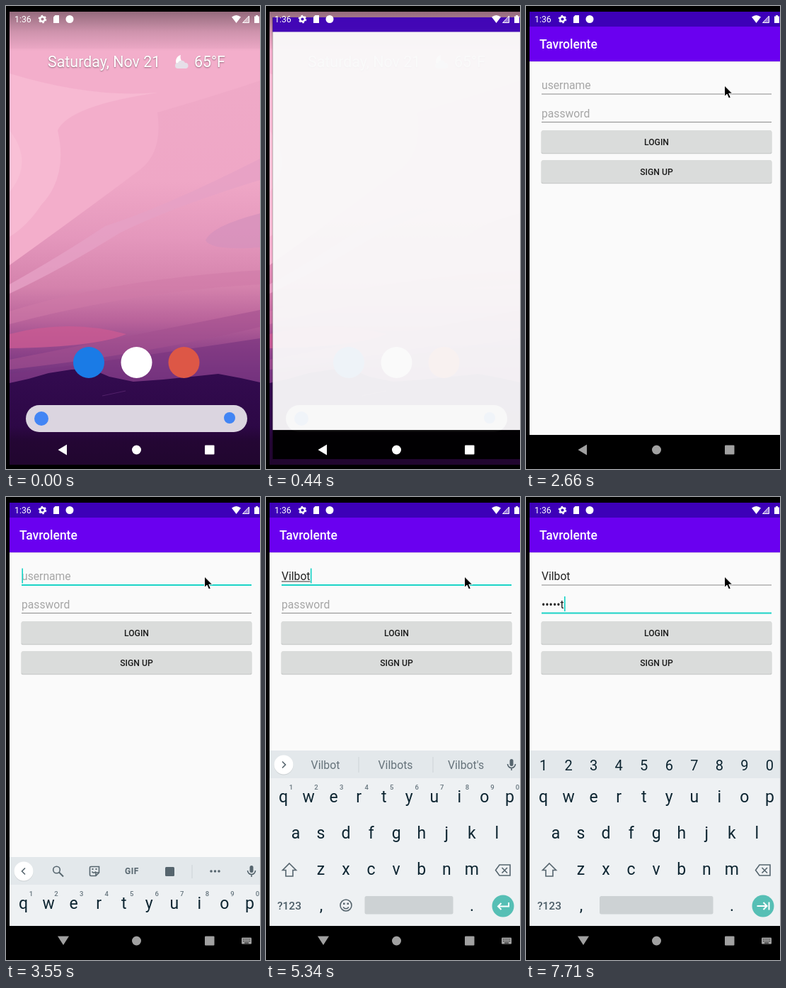
These frames come from a looping animation (359x652 px, 8000 ms). An HTML page:

```html
<!DOCTYPE html>
<html lang="en">
<head>
<meta charset="utf-8">
<title>Login demo</title>
<style>
html, body { margin: 0; width: 100%; height: 100%; overflow: hidden; background: #000; }
svg { display: block; width: 359px; height: 652px; font-family: Roboto, sans-serif; }
.mid { text-anchor: middle; }
.med { font-weight: 500; }
.field { font-size: 15.7px; }
.icon { fill: none; stroke: #56656e; stroke-width: 1.6; }
</style>
</head>
<body>
<svg viewBox="0 0 359 652">
  <defs>
    <linearGradient id="sky" gradientUnits="userSpaceOnUse" x1="0" y1="8" x2="0" y2="540">
      <stop offset="0" stop-color="#efabc8"/><stop offset=".45" stop-color="#efa7c6"/>
      <stop offset=".6" stop-color="#e497bc"/><stop offset=".73" stop-color="#d482ac"/>
      <stop offset=".82" stop-color="#b8629a"/><stop offset=".9" stop-color="#8e4389"/>
      <stop offset="1" stop-color="#5f2a78"/>
    </linearGradient>
    <linearGradient id="hill" x1="0" y1="0" x2="0" y2="1">
      <stop offset="0" stop-color="#330b50"/><stop offset=".6" stop-color="#2d0846"/>
      <stop offset=".75" stop-color="#240634"/><stop offset="1" stop-color="#21062f"/>
    </linearGradient>
    <linearGradient id="shade" x1="0" y1="0" x2="0" y2="1">
      <stop offset="0" stop-color="#000" stop-opacity=".38"/><stop offset=".5" stop-color="#000" stop-opacity=".14"/>
      <stop offset="1" stop-color="#000" stop-opacity="0"/>
    </linearGradient>
    <clipPath id="panel"><rect x="5" y="29" width="354" height="575"/></clipPath>
  </defs>

  <g id="home">
    <rect x="5" y="8" width="359" height="638" fill="url(#sky)"/>
    <path d="M5 60H359V105Q300 125 214 150Q222 205 190 230Q110 290 5 365Z" fill="#f3aecb"/>
    <path d="M5 95Q120 130 215 122Q90 140 73 175Q88 240 50 280Q30 310 5 325Z" fill="#f7b9d2"/>
    <path d="M5 175Q40 220 5 262Z" fill="#f9c0d6"/>
    <path d="M5 392Q80 350 140 310Q220 285 359 215V245Q230 285 160 320Q80 370 5 405Z" fill="#e6a2c6" opacity=".8"/>
    <path d="M359 292Q290 310 282 330Q290 345 359 340Z" fill="#d893bd" opacity=".8"/>
    <path d="M5 430Q150 385 359 372V392Q180 402 5 448Z" fill="#d07aa8" opacity=".55"/>
    <path d="M5 462Q90 440 170 462Q130 480 5 482Z" fill="#cb5a93" opacity=".8"/>
    <path d="M5 498Q150 470 359 428V452Q200 490 5 512Z" fill="#a4508f" opacity=".6"/>
    <path d="M5 518Q160 498 359 468V535H5Z" fill="#7a3580" opacity=".65"/>
    <path d="M5 531L32 525L60 517L92 512L120 511L146 522L180 529L222 526L262 522L300 518L332 524L359 530V646H5Z" fill="url(#hill)"/>
    <path d="M136 549L169 542" stroke="#512069"/>
    <rect x="5" y="8" width="354" height="56" fill="url(#shade)"/>
    <g fill="#fff" font-size="21.4" style="text-shadow:0 1px 2px #0006">
      <text x="59" y="86">Saturday, Nov 21</text><text x="266" y="86">65°F</text>
    </g>
    <path d="M247 69A9 9 0 1 0 257 82A10 10 0 0 1 247 69Z" fill="#fff"/>
    <path d="M243 88a4 4 0 0 1 0-8a5.500 5.500 0 0 1 10 0a4 4 0 0 1 1 8Z" fill="#e6dfe8"/>
    <circle cx="117" cy="502" r="22" fill="#1a7be6"/>
    <circle cx="184.500" cy="502" r="22" fill="#fff"/>
    <circle cx="251.500" cy="502" r="22" fill="#dd5746"/>
    <rect x="28" y="562" width="313" height="38" rx="19" fill="#dbd5e0"/>
    <circle cx="50" cy="581" r="10" fill="#4285f4"/>
    <circle cx="316" cy="580" r="8" fill="#4285f4"/>
  </g>

  <g id="win">
    <rect x="5" y="8" width="359" height="638"/>
    <rect x="5" y="8" width="359" height="21.500" fill="#3d00b8"/>
    <rect x="5" y="29" width="359" height="575" fill="#fafafa"/>
  </g>

  <g id="app">
    <rect x="5" y="29" width="354" height="49" fill="#6a00f0"/>
    <rect x="5" y="78" width="354" height="1" fill="#e2e2e2"/>
    <text class="med" x="19" y="60" font-size="17.500" fill="#fff">Tavrolente</text>
    <g id="fields"></g>
    <g id="buttons"></g>
  </g>

  <g clip-path="url(#panel)"><g id="kb">
    <rect x="5" y="357" width="354" height="247" fill="#eef1f3"/>
    <rect x="5" y="357" width="354" height="39" fill="#e3e8eb"/>
    <g id="keys" class="mid" font-size="23" fill="#0d2531"></g>
    <g id="hints" class="mid med" font-size="9.500" fill="#66757e"></g>
    <g id="digits" class="mid" font-size="20" fill="#0d2531"></g>
    <text class="med" x="16" y="581" font-size="15.500" fill="#4b5c66">?123</text>
    <g class="icon">
      <path d="M33 516L42.500 525.500H38V534H28V525.500H23.500Z"/>
      <path d="M330 518H345V533H330L324.500 525.500ZM333.500 522L341 529.500M341 522L333.500 529.500"/>
      <circle cx="113" cy="575" r="8"/><path d="M109 577.500Q113 582 117 577.500"/>
    </g>
    <path d="M109 571.500h2.500v2.500h-2.500zM114.500 571.500h2.500v2.500h-2.500z" fill="#56656e"/>
    <rect id="space" y="562" height="25.500" rx="2.500" fill="#cdd2d4"/>
    <circle cx="335" cy="576" r="15.500" fill="#56bfb5"/>
    <path id="enter" fill="none" stroke="#fff" stroke-width="2"/>
    <g id="bar">
      <circle cx="25" cy="378" r="13.500" fill="#cbd0d3"/><circle cx="25" cy="377" r="13.500" fill="#fff"/>
      <path id="chev" class="icon"/>
      <rect x="344.500" y="369" width="5" height="10" rx="2.500" fill="#56656e"/>
      <path class="icon" d="M341.500 376a5.500 5.500 0 0 0 11 0M347 381.500V385"/>
    </g>
    <g id="tools">
      <g class="icon">
        <circle cx="71.500" cy="375" r="4.800"/><path d="M75 378.500L81 384.500" stroke-width="2"/>
        <path d="M120 370.500H131.500V379L127 383.500H120Q118.500 383.500 118.500 382V372Q118.500 370.500 120 370.500ZM131.500 379H127V383.500M121.500 377.500Q124 381 127 377.500"/>
      </g>
      <path d="M121.500 373h2v2h-2zM126.500 373h2v2h-2z" fill="#56656e"/>
      <text class="mid" x="178" y="381" font-size="12" font-weight="700" fill="#56656e" letter-spacing=".6">GIF</text>
      <rect x="225" y="371" width="13" height="13" rx="1.500" fill="#56656e"/>
      <path d="M263 368V387" stroke="#cdd3d7"/>
      <path d="M290 377h.01M295.500 377h.01M301 377h.01" stroke="#56656e" stroke-width="3.600" stroke-linecap="round"/>
    </g>
    <g id="sugg" class="mid" font-size="15.800" fill="#66737b"><path d="M131 366V388M236 366V388" stroke="#cdd3d7"/></g>
  </g></g>

  <g fill="#fff">
    <text x="12" y="23" font-size="12.300">1:36</text>
    <circle cx="51.500" cy="18.500" r="3.300" fill="none" stroke="#fff" stroke-width="2.400"/>
    <circle cx="51.500" cy="18.500" r="5" fill="none" stroke="#fff" stroke-width="1.600" stroke-dasharray="2.6 2.636"/>
    <path d="M69.500 13H75V24H67V15.500Z"/>
    <circle cx="90" cy="18.500" r="5.500"/>
    <path d="M319 15.500Q325.500 10.500 332 15.500L325.500 24Z"/>
    <path d="M334.500 23.500L343.500 14V23.500Z" fill-opacity=".45" stroke="#fff"/>
    <path d="M351 14.500h2v-1.500h3v1.500h2v9.500h-7z"/>
  </g>

  <g id="nav" fill="#fff">
    <path id="back"/>
    <circle cx="184.500" cy="625" r="6.500"/>
    <rect x="281" y="618.500" width="13.500" height="13" rx="1"/>
    <g id="ime"><rect x="333" y="620.500" width="14" height="9" rx="1"/>
      <path d="M335 623H345M335 625.500H345" stroke="#000" stroke-dasharray="1 1.250"/><path d="M337 628H343" stroke="#000"/></g>
  </g>
  <path id="mouse" d="M0 0V15.500L3.600 12.200L6.100 18L8.800 16.800L6.300 11.200H11.200Z" stroke="#fff"/>
</svg>

<script>
const LOOP = 8000, NAME = 'Vilbot';
const $ = id => document.getElementById(id);

function add(parent, tag, attrs, text = '') {
  const el = document.createElementNS('http://www.w3.org/2000/svg', tag);
  for (const k in attrs) el.setAttribute(k, attrs[k]);
  el.textContent = text;
  return $(parent).appendChild(el);
}
const set = (id, attrs) => { for (const k in attrs) $(id).setAttribute(k, attrs[k]); };
const show = (id, on) => { $(id).style.display = on ? '' : 'none'; };
const at = (steps, t) => steps.reduce((v, s) => t >= s[0] ? s : v, null);

// Form
function makeField(hint, y) {
  const line = add('fields', 'rect', { x: 22, width: 325 });
  const label = add('fields', 'text', { class: 'field', x: 22, y });
  const mark = add('fields', 'rect', { x: 22, y: y + 1.5, height: 1, fill: '#333' });
  const caret = add('fields', 'rect', { y: y - 16.5, width: 1.6, height: 21, fill: '#14d3c6' });
  return (text, focus, composing, blinkOn) => {
    label.textContent = text || hint;
    label.setAttribute('fill', text ? '#222' : '#a6a6a6');
    const w = text ? label.getComputedTextLength() : 0;
    mark.setAttribute('width', composing ? w : 0);
    caret.setAttribute('x', 22.4 + w);
    caret.style.display = focus && blinkOn ? '' : 'none';
    line.setAttribute('y', y + (focus ? 6 : 6.5));
    line.setAttribute('height', focus ? 2 : 1);
    line.setAttribute('fill', focus ? '#1bd4c7' : '#8b8b8b');
  };
}
const user = makeField('username', 117), pass = makeField('password', 156.5);
[['LOGIN', 175], ['SIGN UP', 217]].forEach(([s, y]) => {
  add('buttons', 'rect', { x: 21.5, y: y + .8, width: 326, height: 32.5, rx: 2, fill: '#c9cbca' });
  add('buttons', 'rect', { x: 22, y, width: 325, height: 32, rx: 2, fill: '#dadcdb' });
  add('buttons', 'text', { class: 'mid med', x: 184.5, y: y + 20.7, 'font-size': 12.2, fill: '#1b1b1b' }, s);
});

// Keyboard
[['qwertyuiop', 24.5, 430], ['asdfghjkl', 42, 481], ['zxcvbnm', 77.5, 532]].forEach(([row, x0, y]) =>
  [...row].forEach((c, i) => add('keys', 'text', { x: x0 + i * 35.55, y }, c)));
add('keys', 'text', { x: 78, y: 583 }, ',');
add('keys', 'text', { x: 291, y: 583 }, '.');
for (let i = 0; i < 10; i++) {
  const d = (i + 1) % 10, x = 24.5 + i * 35.55;
  add('hints', 'text', { x: x + 11, y: 412 }, d);
  add('digits', 'text', { x, y: 385 }, d);
}
const words = [84, 183, 282.5].map(x => add('sugg', 'text', { x, y: 383 }));

// Steps: time, then values
const opening = [[300, .9, .66], [440, .975, .95], [590, 1, 1]];
const pointer = [[2070, 343, 228], [2220, 330, 150], [2360, 312, 73], [2510, 290, 98], [2660, 280.5, 112]];
const slide = [[3550, 150], [3700, 40], [3840, 6], [3990, 0]];
const userTyping = [4290, 4440, 4590, 4740, 4890, 5040];
const passTyping = [6380, 6670, 7120, 7270, 7570, 7710];
const typed = (times, t) => times.filter(s => t >= s).length;

function render(t) {
  const win = at(opening, t), inApp = t >= 890;
  show('win', win);
  if (win) set('win', {
    opacity: win[2],
    transform: `translate(184.5 327) scale(${win[1]}) translate(-184.5 -327)`
  });
  show('app', inApp);

  const onPass = t >= 5490, secure = t >= 5630;
  const n = typed(userTyping, t), m = typed(passTyping, t);
  const word = NAME.slice(0, n);
  user(word, t >= 3400 && !onPass, n && !onPass, true);
  pass(m ? '•'.repeat(m - 1) + NAME[m - 1].toLowerCase() : '', onPass, false, t < 6080 || m > 0);

  const kb = at(slide, t), suggest = n > 1 && !secure;
  show('kb', kb);
  if (kb) set('kb', { transform: `translate(0 ${kb[1]})` });
  show('bar', !secure);
  show('hints', !secure);
  show('digits', secure);
  show('tools', n < 2);
  show('sugg', suggest);
  set('chev', { d: suggest ? 'M23 372.5L27.500 377L23 381.500' : 'M27 372.5L22.500 377L27 381.500' });
  ['', 's', "'s"].forEach((end, i) => { words[i].textContent = word + end; });
  const x = secure ? 104 : 139.5;
  set('space', { x, width: 264.5 - x });
  set('enter', { d: secure ? 'M326.500 576H340M335.500 571L340.500 576L335.500 581M343.500 570.500V581.500'
                           : 'M343 571V576.500H328M332.500 572L328 576.500L332.500 581' });

  const dim = Math.min(1, Math.max(0, (t - 890) / 1030));
  set('nav', { opacity: 1 - .37 * dim });
  set('back', { d: kb ? 'M73 618.500H89L81 631Z' : 'M73.500 625L86 617.500V632.500Z' });
  show('ime', kb);

  const p = at(pointer, t);
  show('mouse', p);
  if (p) set('mouse', { transform: `translate(${p[1]} ${p[2]})` });
}

const start = performance.now();
function tick() {
  render((performance.now() - start) % LOOP);
  requestAnimationFrame(tick);
}
tick();
</script>
</body>
</html>
```
